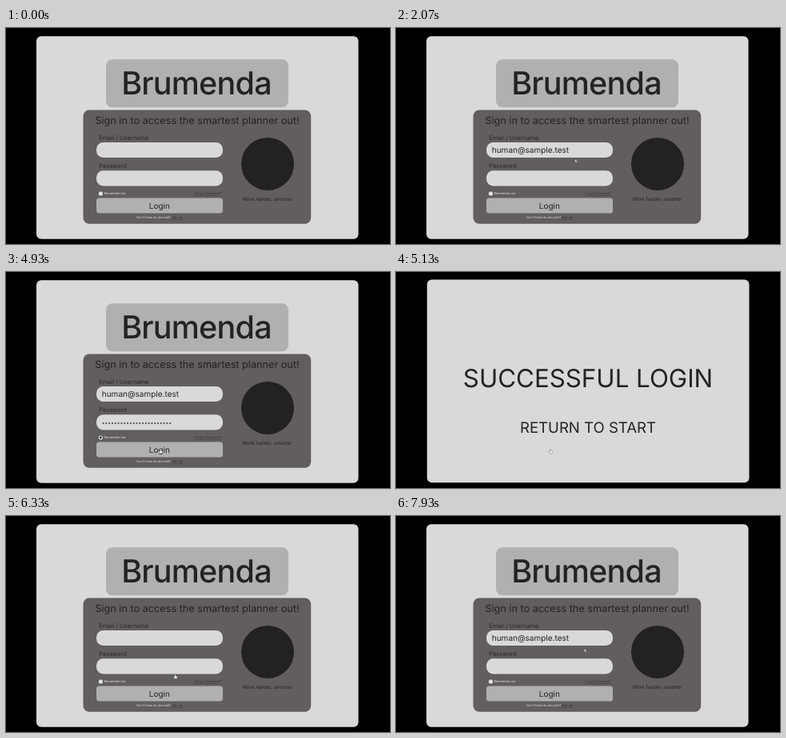
These frames come from a looping animation (480x270 px, 8 s). An HTML page:

```html
<!DOCTYPE html>
<html lang="en">
<head>
<meta charset="utf-8">
<title>Login flow</title>
<style>
  html, body { margin: 0; width: 100%; height: 100%; overflow: hidden; background: #000; }
  svg { display: block; width: 100vw; height: 100vh; }
  text {
    font-family: Inter, Roboto, sans-serif;
    font-optical-sizing: none;
    text-rendering: geometricPrecision;
    fill: #242223;
  }
  .mid { text-anchor: middle; }
  .title { font-size: 39.5px; font-weight: 500; letter-spacing: -.02em; }
  .label { font-size: 7.5px; fill: #2b2829; }
  .small { font-size: 3.9px; }
  .pale { fill: #e4e2e3; }
  .link { fill: #383536; text-decoration: underline; text-decoration-thickness: .25px; }
  .field { fill: #d9d9d9; }
  .plate { fill: #b0b0b0; }
  #cursor path { fill: #fff; stroke: #555; stroke-width: .4; stroke-linejoin: round; }
</style>
</head>
<body>
<svg viewBox="0 0 480 270">
  <rect width="480" height="270"/>

  <g id="login">
    <rect class="field" x="38" y="10.3" width="402.5" height="253.4" rx="6"/>
    <rect class="plate" x="125" y="39.3" width="228" height="60" rx="8"/>
    <text class="mid title" x="238" y="83.4">Brumenda</text>

    <rect x="96.5" y="102.5" width="284.7" height="142.3" rx="7.5" fill="#625d5e"/>
    <text class="mid" x="239" y="120.2" font-size="12.7">Sign in to access the smartest planner out!</text>

    <text class="label" x="116.2" y="139.8">Email / Username</text>
    <rect class="field" x="113" y="143" width="158" height="19" rx="8.5"/>
    <text id="email" x="119.8" y="156" font-size="10">human@sample.test</text>

    <text class="label" x="116.2" y="175.2">Password</text>
    <rect class="field" x="113" y="178.2" width="158" height="19.2" rx="8.5"/>
    <path id="password" d="M121.6 189.1H207" fill="none" stroke="#555354" stroke-width="2.3" stroke-linecap="round" stroke-dasharray="0 3.8"/>

    <circle cx="118.4" cy="207" r="2.6" fill="#e4e4e4"/>
    <circle id="tick" cx="118.4" cy="206.9" r="1.4" fill="#222021"/>
    <text class="small pale" x="122.6" y="208.3">Remember me</text>
    <text class="small link" x="236" y="208.3">Forgot Password?</text>

    <rect class="plate" x="113" y="212.6" width="158" height="19" rx="3.5"/>
    <text class="mid" x="191.8" y="226" font-size="10">Login</text>
    <text class="small pale" x="163.3" y="238.2">Don't have an account?</text>
    <text class="small link" x="206.6" y="238.2">Sign up</text>

    <circle cx="327" cy="170" r="33" fill="#232122"/>
    <text class="mid" x="326.5" y="216.3" font-size="6.2" font-style="italic">Work harder, smarter</text>
  </g>

  <g id="success">
    <rect class="field" x="38.8" y="9.5" width="402.7" height="253.7" rx="6"/>
    <text class="mid" x="240" y="144" font-size="31.3">SUCCESSFUL LOGIN</text>
    <text class="mid" x="240" y="201" font-size="18.6">RETURN TO START</text>
  </g>

  <g id="cursor">
    <path id="arrow" d="M0 0V4L1 3.1L1.7 4.5L2.3 4.2L1.7 2.9H3Z"/>
    <path id="hand" d="M-.5 .5Q0 -.2 .5 .5V2.4L2.3 2.9Q2.8 3.2 2.6 4L2 5.7H-.8L-2 3.7Q-1.9 2.9 -1.2 3.3L-.5 3.8Z"/>
  </g>
</svg>

<script>
const TICK = 1000 / 15;
const TICKS = 120;

// Each move: first tick, last tick, end x, end y
const START = [440, 165];
const MOVES = [
  [11, 20, 226, 158],
  [27, 40, 218, 181.5],
  [42, 45, 235, 188],
  [50, 59, 120.5, 206.5],
  [63, 74, 193, 221],
  [82, 90, 211.5, 197.5],
  [99, 109, 231, 153],
  [115, 119, 235.5, 166]
];

// Spans of ticks in which the cursor is a hand
const HAND = [[19, 29], [41, 52], [58, 65], [72, 80], [90, 101], [108, 118]];

const $ = id => document.getElementById(id);
const show = (id, on) => { $(id).style.display = on ? "" : "none"; };
const within = (k, from, to) => k >= from && k < to;
const ease = u => (u + u * u * (3 - 2 * u)) / 2;

function cursorAt(k) {
  let [x, y] = START;
  for (const [from, to, endX, endY] of MOVES) {
    if (k <= from) break;
    const e = ease(Math.min(1, (k - from) / (to - from)));
    x += (endX - x) * e;
    y += (endY - y) * e;
  }
  return [x, y];
}

function draw(ms) {
  const k = Math.floor((ms + 4) / TICK) % TICKS;
  const done = within(k, 77, 95);
  const hand = HAND.some(([from, to]) => within(k, from, to));

  show("login", !done);
  show("success", done);
  show("email", within(k, 23, 95) || k >= 116);
  show("password", within(k, 43, 95));
  show("tick", within(k, 61, 95));
  show("cursor", k >= 12);
  show("hand", hand);
  show("arrow", !hand);
  $("cursor").setAttribute("transform", `translate(${cursorAt(k)})`);
}

const begin = performance.now();
function loop() {
  draw((performance.now() - begin) % (TICK * TICKS));
  requestAnimationFrame(loop);
}
loop();
</script>
</body>
</html>
```
